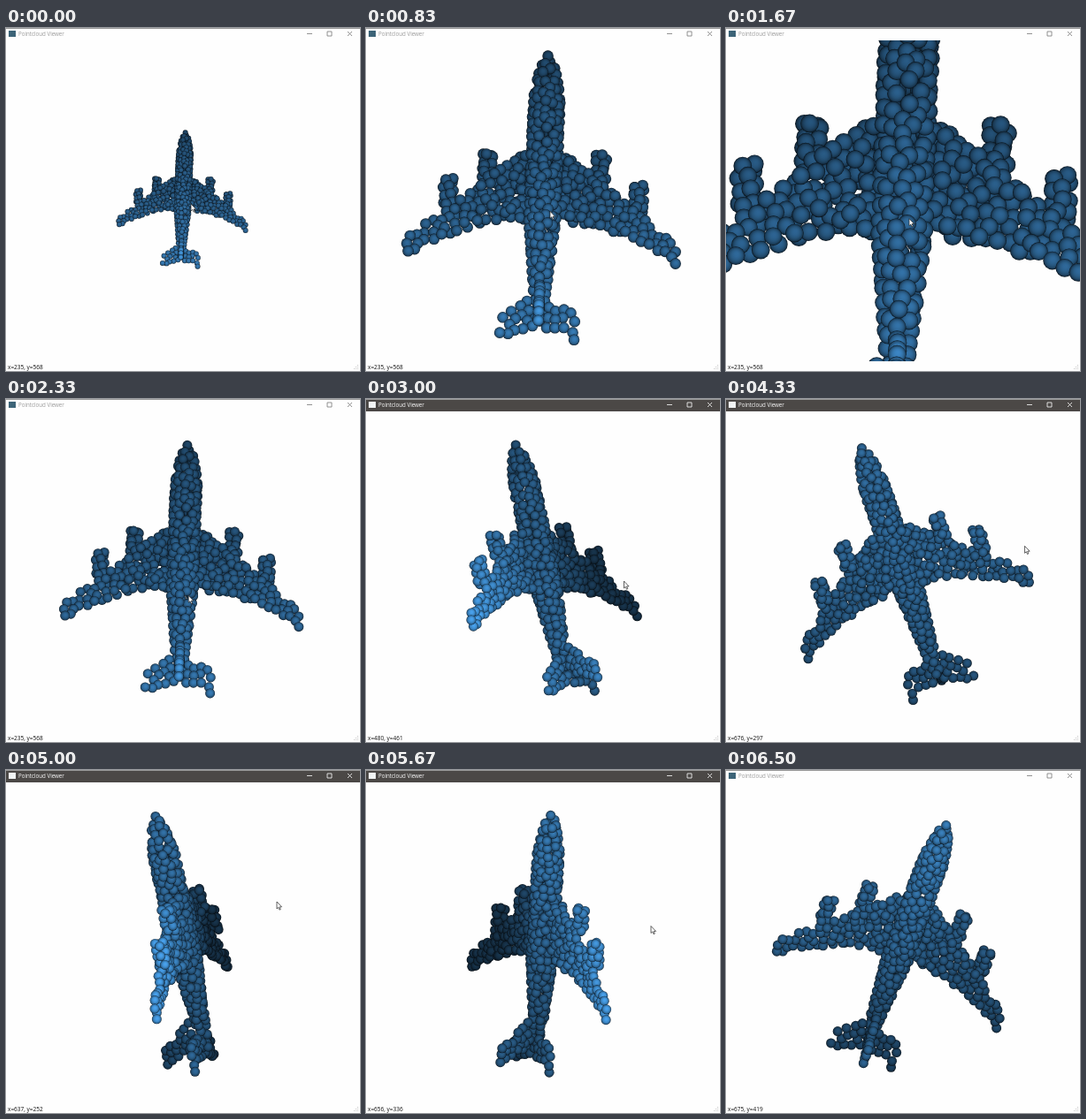
Animation, 400 px wide and 388 px high, one loop 6670 ms. Source, as an HTML page with a canvas:

```html
<!DOCTYPE html>
<html lang="en">
<head>
<meta charset="utf-8">
<title>Pointcloud Viewer</title>
<style>
  html, body { margin: 0; width: 100%; height: 100%; overflow: hidden; background: #fefefe; }
  #win { position: relative; width: 400px; height: 388px; overflow: hidden; font-family: "Open Sans", "Noto Sans", sans-serif; }
  #win > * { position: absolute; }
  #bar { left: 0; top: 0; width: 400px; height: 14px; color: #999; background: #fefefe; box-shadow: inset 0 1px #999; }
  #bar.on { color: #fff; background: #4b4846; }
  #bar span { position: absolute; left: 14px; top: 2px; font-size: 6.2px; line-height: 10px; white-space: nowrap; }
  #bar i { position: absolute; left: 3px; top: 3px; width: 8px; height: 7px; background: #3d6478; }
  #bar.on i { background: #f2f5f6; }
  #bar svg { position: absolute; left: 0; top: 0; fill: none; stroke: #777; stroke-width: .8; }
  #bar.on svg { stroke: #fff; }
  #view { left: 0; top: 14px; }
  #pos { left: 2px; top: 379px; font-size: 6.5px; line-height: 10px; color: #111; white-space: nowrap; }
  #grip { left: 392px; top: 381px; fill: #c4c4c4; }
  #cur { left: 0; top: 0; overflow: visible; }
</style>
</head>
<body>
<div id="win">
  <div id="bar">
    <i></i><span>Pointcloud Viewer</span>
    <svg width="400" height="14"><path d="M340 6.5h6M363 4h5v5h-5zM386 4l5 5M391 4l-5 5"/></svg>
  </div>
  <canvas id="view" width="400" height="363"></canvas>
  <div id="pos"></div>
  <svg id="grip" width="8" height="7"><path d="M5 0h1v1h-1zM3 2h1v1h-1zM5 2h1v1h-1zM1 4h1v1h-1zM3 4h1v1h-1zM5 4h1v1h-1z"/></svg>
  <svg id="cur" width="8" height="12"><path d="M0 0V8L1.8 6.4L3 9.2L4.3 8.6L3.1 5.9H5.6Z" fill="#fff" stroke="#222" stroke-width=".7"/></svg>
</div>
<script>
const LOOP = 6670, LAST = 39, PEAK = 9, REST = 14, DRAG = 16;
const $ = id => document.getElementById(id);
const ctx = $('view').getContext('2d');
const mix = (a, b, t) => a + (b - a) * t;
const clamp = (v, lo, hi) => Math.max(lo, Math.min(hi, v));

// step, turn in degrees, nose x and z, pointer x and y, shown x and y
const KEYS = [
  [0, 0, .035, -.25, 209, 199, 235, 568],
  [15, 0, .035, -.25, 206, 224, 235, 568],
  [21, 90, -.45, 0, 377, 188, 725, 353],
  [30, 250, -.21, .15, 306, 149, 637, 252],
  [38, 360, .331, .29, 338, 204, 675, 419]
];
function stateAt(k) {
  const i = Math.max(1, KEYS.findIndex(e => e[0] >= k)), end = KEYS.length - 1;
  const n = k > KEYS[end][0] ? end : i, a = KEYS[n - 1], b = KEYS[n];
  const f = Math.min(1, (k - a[0]) / (b[0] - a[0]));
  return a.map((v, j) => mix(v, b[j], f)).slice(1);
}

// wheel in, then wheel out to full size
const zoomAt = k => k <= PEAK ? .54 * 1.162 ** k : 1.172 ** Math.max(0, REST - k);

let seed = 11;
const rnd = () => (seed = seed * 16807 % 2147483647) / 2147483647;

// model points: [forward, right, up], kept at least gap apart
const pts = [];
function scatter(tries, gap, make) {
  while (tries--) {
    const p = make();
    if (pts.every(q => Math.hypot(p[0] - q[0], p[1] - q[1], p[2] - q[2]) > gap)) pts.push(p);
  }
}
function tube(a0, a1, radius, b, c) {
  return () => {
    const a = mix(a0, a1, rnd()), w = rnd() * 2 * Math.PI, r = radius(a);
    return [a, b + r * Math.cos(w), c + r * Math.sin(w)];
  };
}
// flat panel from root to tip between two edges
function panel(b0, b1, lead, trail, up) {
  return () => {
    const t = rnd();
    return [mix(lead(t), trail(t), rnd()), mix(b0, b1, t), up(t)];
  };
}
function bodyRadius(a) {
  const nose = Math.sqrt(Math.min(1, (148 - a) / 45));
  const tail = Math.min(1, 1 - .75 * (-20 - a) / 102);
  return 13.5 * nose * tail;
}
function build() {
  scatter(5000, 6.6, tube(148, -122, bodyRadius, 0, 0));
  for (const s of [-1, 1]) {
    scatter(200, 6, tube(51, 23, () => 5.2, s * 56, -9));
    scatter(200, 6, tube(21, -7, () => 5.2, s * 94, -6));
    scatter(1500, 6.4, panel(s * 10, s * 134, t => 58 - 101 * t, t => -18 - 43 * t * t,
      t => mix(-6, 2, t) + (rnd() - .5) * 14 * (1 - t)));
    scatter(300, 7.3, panel(s * 5, s * 38, t => -100 - 18 * t, t => -130 - 14 * t, t => 4 + 2 * t));
  }
  scatter(400, 6.5, panel(0, 0, t => -88 - 32 * t, t => -118 - 18 * t, t => mix(10, 51, t)));
}

const dot = (a, b) => a[0] * b[0] + a[1] * b[1] + a[2] * b[2];
const cross = (a, b) => [a[1] * b[2] - a[2] * b[1], a[2] * b[0] - a[0] * b[2], a[0] * b[1] - a[1] * b[0]];

// forward, right and up in screen space (y down, z to the viewer)
function axes(turn, x, z) {
  const w = turn * Math.PI / 180;
  const u = [x, -Math.sqrt(1 - x * x - z * z), z];
  const side = [Math.cos(w), 0, -Math.sin(w)], d = dot(side, u);
  const r = side.map((v, i) => v - d * u[i]), len = Math.hypot(...r);
  const right = r.map(v => v / len);
  return [u, right, cross(u, right)];
}

// one ball shading for each level of brightness
const LEVELS = 24;
const shades = Array.from({ length: LEVELS }, (_, i) => {
  const light = mix(.45, 1.4, i / (LEVELS - 1));
  const g = ctx.createRadialGradient(.12, -.2, 0, 0, 0, 1);
  for (let d = 0; d <= 1; d += .125) {
    const v = light * (.16 + .84 * Math.sqrt(1 - d * d));
    g.addColorStop(d, `rgb(${52 * v},${116 * v},${170 * v})`);
  }
  return g;
});

function drawCloud(k, turn, x, z) {
  const zoom = zoomAt(k), size = 5.5 * zoom, frame = axes(turn, x, z);
  const balls = pts.map(p => [0, 1, 2].map(i => dot(p, frame.map(a => a[i]))));
  balls.sort((a, b) => a[2] - b[2]);
  ctx.setTransform(1, 0, 0, 1, 0, 0);
  ctx.clearRect(0, 0, 400, 363);
  for (const [bx, by, depth] of balls) {
    const level = clamp((depth + 61) / 153, 0, 1);
    ctx.fillStyle = shades[Math.round(level * (LEVELS - 1))];
    ctx.setTransform(size, 0, 0, size, 200 + zoom * bx, 181.5 + zoom * by);
    ctx.beginPath();
    ctx.arc(0, 0, 1, 0, 2 * Math.PI);
    ctx.fill();
  }
}

function show(k) {
  const [turn, nx, nz, mx, my, x, y] = stateAt(k);
  drawCloud(k, turn, nx, nz);
  $('cur').style.transform = `translate(${mx}px,${my}px)`;
  $('cur').style.display = k < LAST ? '' : 'none';
  $('pos').textContent = `x=${Math.round(x)}, y=${Math.round(y)}`;
  $('bar').className = k >= DRAG && k < LAST ? 'on' : '';
}

// six steps a second, starts rounded to 10 ms
function stepAt(t) {
  let k = Math.min(LAST, Math.floor(t * .006) + 1);
  while (Math.round(k * 100 / 6) * 10 > t) k--;
  return k;
}

build();
const t0 = performance.now();
let shown = -1;
function tick() {
  const k = stepAt((performance.now() - t0) % LOOP);
  if (k !== shown) show(shown = k);
  requestAnimationFrame(tick);
}
tick();
</script>
</body>
</html>
```
